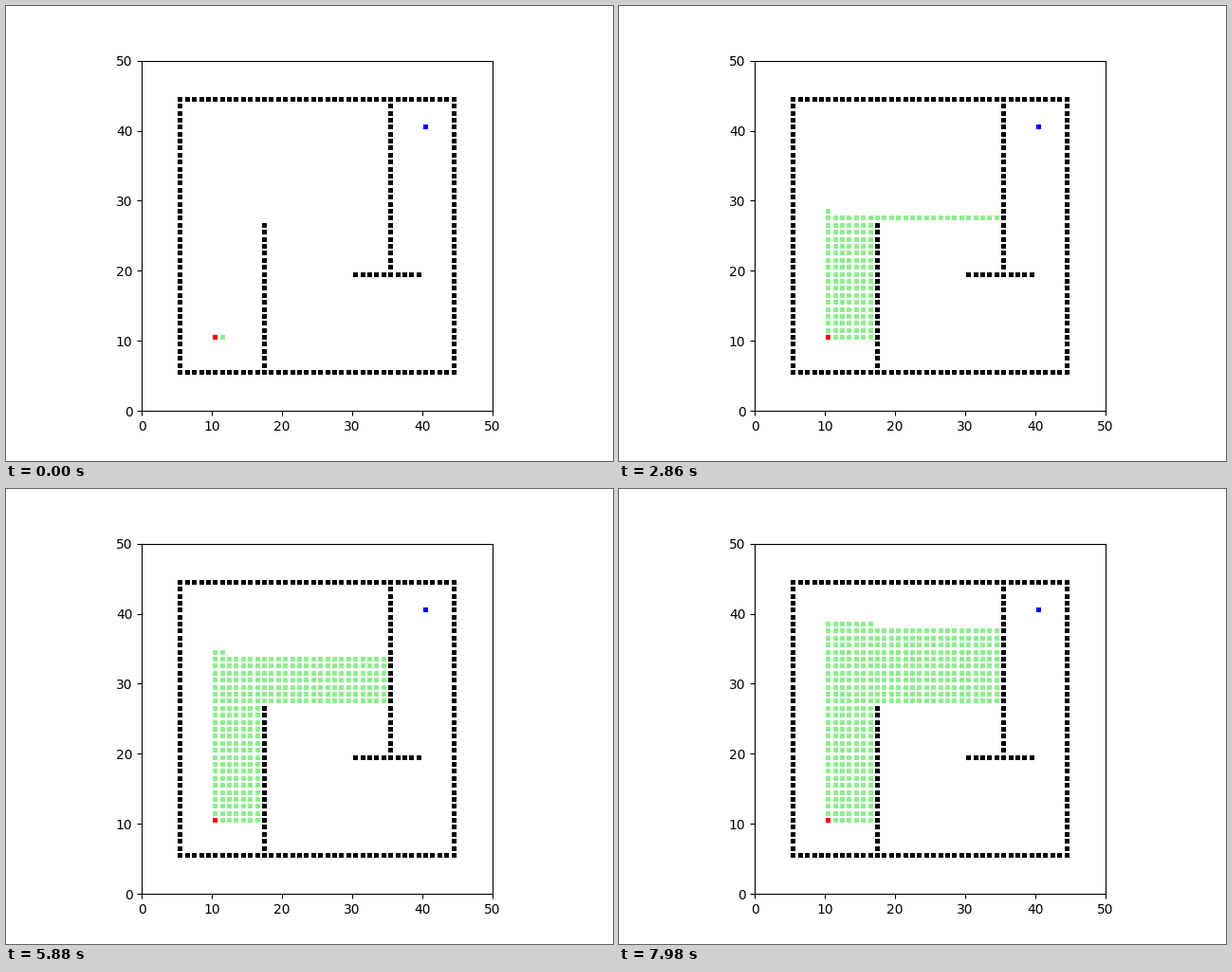
A matplotlib script that plays this animation: 640 px wide and 480 px high, repeating every 8000 ms.

```python
import matplotlib.pyplot as plt
import numpy as np
from matplotlib.animation import FuncAnimation
from matplotlib.collections import PolyCollection
from matplotlib.transforms import IdentityTransform

FRAMES, INTERVAL = 400, 20
START, GOAL = (10, 10), (40, 40)
HALF = 2.5  # half a cell's side, in pixels

fig, ax = plt.subplots(figsize=(6.4, 4.8), dpi=100)
ax.set_aspect("equal")
ax.set_xlim(0, 50)
ax.set_ylim(0, 50)
ax.set_xticks(range(0, 51, 10))
ax.set_yticks(range(0, 51, 10))
ax.apply_aspect()


def squares(cells):
    """Pixel-aligned squares centred on the given grid cells."""
    points = ax.transData.transform(np.array(cells) + 0.5)
    centres = np.floor(points) + 0.5
    corners = HALF * np.array([(-1, -1), (1, -1), (1, 1), (-1, 1)])
    return centres[:, None, :] + corners


def add_cells(cells, color):
    group = PolyCollection(squares(cells), facecolors=color, linewidths=0,
                           antialiaseds=False, transform=IdentityTransform())
    ax.add_collection(group, autolim=False)
    return group


def build_walls():
    walls = set()
    for i in range(5, 45):
        walls |= {(i, 5), (i, 44), (5, i), (44, i)}
    walls |= {(17, y) for y in range(5, 27)}
    walls |= {(35, y) for y in range(19, 45)}
    walls |= {(x, 19) for x in range(30, 40)}
    return walls


def scan(walls):
    """Visit cells row by row, each row running right until a wall."""
    order = []
    for y in range(START[1], 44):
        x = START[0]
        while (x, y) not in walls:
            if (x, y) != START:
                order.append((x, y))
            x += 1
    return order


walls = build_walls()
path = squares(scan(walls)[:FRAMES])

add_cells(sorted(walls), "black")
visited = add_cells([START], "lightgreen")
add_cells([START], "red")
add_cells([GOAL], "blue")


def update(i):
    visited.set_verts(path[:i + 1])
    return (visited,)


anim = FuncAnimation(fig, update, frames=FRAMES, interval=INTERVAL,
                     repeat=True, repeat_delay=0)
plt.show()
```
